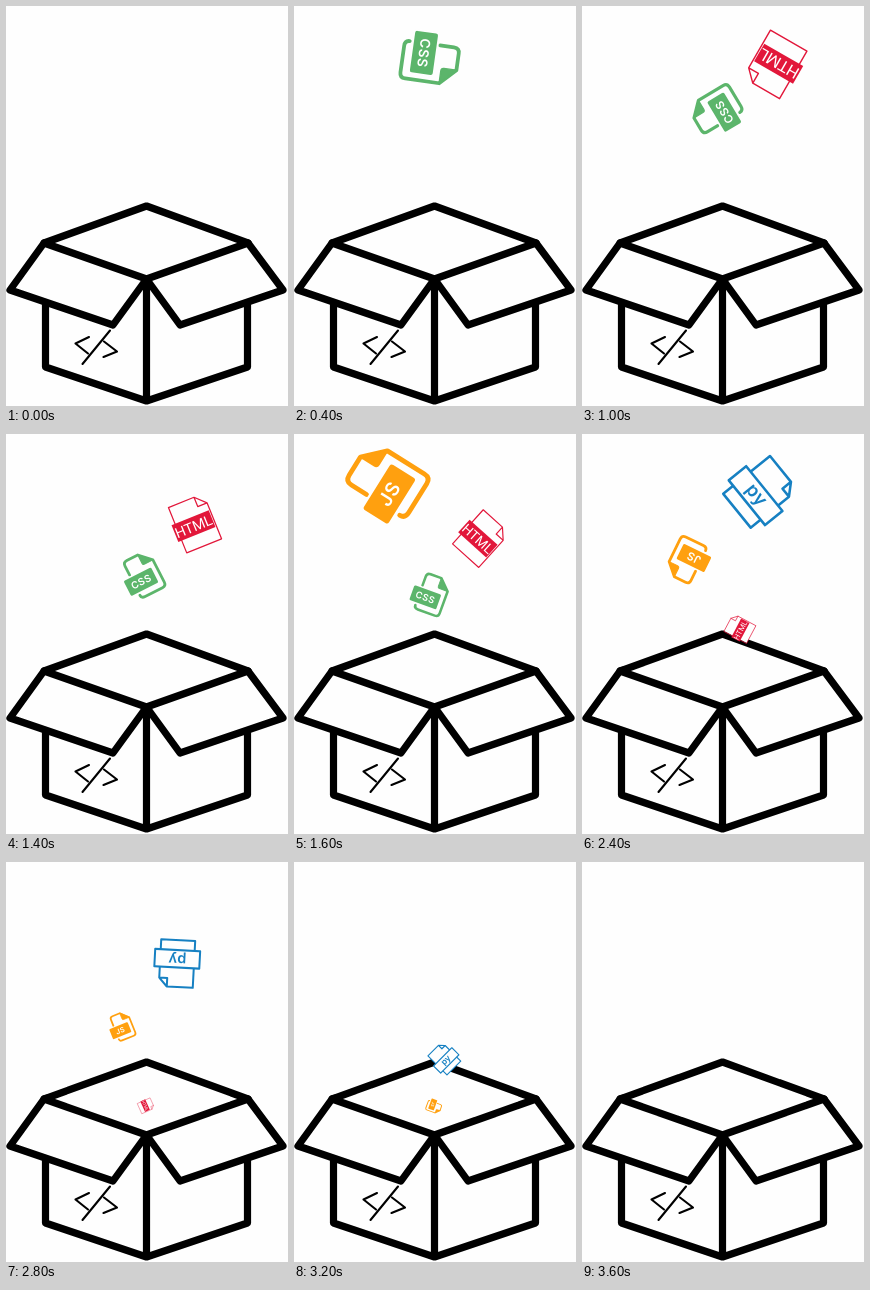
An HTML page that plays this animation: 282 px wide and 400 px high, repeating every 3800 ms.

```html
<!DOCTYPE html>
<html lang="en">
<head>
<meta charset="utf-8">
<title>Files into a box</title>
<style>
  html, body { margin: 0; width: 100%; height: 100%; overflow: hidden; background: #fefefe; }
  svg { display: block; width: 100%; height: 100%; }
  text { text-anchor: middle; font-family: Roboto, sans-serif; }
  .file { stroke-linejoin: round; stroke-linecap: round; }
  .tag { font-family: Inter, sans-serif; font-weight: 600; letter-spacing: .3px; }
</style>
</head>
<body>
<svg viewBox="0 0 282 400">
  <defs>
    <g id="sheet">
      <path d="M-10-6V-16Q-10-20-6-20H6L17-9V15.500Q17 19.500 13 19.500H-6Q-10 19.500-10 16" fill="none" stroke="currentColor" stroke-width="2.700"/>
      <path d="M6-20V-11Q6-9 8-9H17Z" fill="currentColor" stroke="currentColor"/>
      <rect x="-18" y="-3.500" width="30" height="16.500" rx="1.500" fill="currentColor" stroke="#fefefe" stroke-width="2.500" paint-order="stroke"/>
    </g>
  </defs>

  <g fill="none" stroke="#000" stroke-width="7.200" stroke-linejoin="round" stroke-linecap="round">
    <path d="M39.500 297V361L140.500 395L241.500 361V297M140.500 273V395"/>
    <path d="M140.500 200L242 237L140.500 273L38 237Z"/>
    <path d="M38 237L4 284L107 319L140.500 273L174 319L277 284L242 237"/>
    <path d="M83 331L69.500 337.500L82 347.500M104 324.500L76.500 358M98 335.500L111 345.500L97.500 351" stroke-width="2.100"/>
  </g>

  <g class="file" id="css" color="#5cb56b">
    <use href="#sheet"/>
    <text class="tag" x="-3" y="8.300" font-size="9.800" fill="#fff">CSS</text>
  </g>

  <g class="file" id="html" color="#e2173a">
    <path d="M-15-19.500H7L15-11.500V19.500H-15ZM7-19.500V-11.500H15" fill="#fefefe" stroke="currentColor"/>
    <rect x="-18" y="-5.500" width="32" height="14.500" fill="currentColor"/>
    <text x="-2" y="6" font-size="11.500" fill="#fff">HTML</text>
  </g>

  <g class="file" id="js" color="#ffa00f">
    <use href="#sheet"/>
    <text class="tag" x="-3" y="8.500" font-size="10.800" fill="#fff">JS</text>
  </g>

  <g class="file" id="py" color="#1680c2">
    <path d="M-17-23.500H9L17-15V23.500H-17ZM9-23.500V-15H17" fill="#fefefe" stroke="currentColor" stroke-width="2"/>
    <rect x="-22.500" y="-4" width="45" height="17.500" fill="#fefefe" stroke="currentColor" stroke-width="2"/>
    <text class="tag" y="8.500" font-size="14.500" fill="currentColor">py</text>
  </g>
</svg>
<script>
const STEP = 200, STEPS = 19;
const inside = { x: 140, y: 244, size: 0.36 };

// A file drifts from `from` to `over`, then drops inside the box, spinning evenly.
const files = {
  css: {
    enter: 1, drop: 8, gone: 11, turn: 380, spin: 47,
    from: { x: 136, y: 34, size: 1.47 }, over: { x: 135.5, y: 160, size: 0.95 }
  },
  html: {
    enter: 4, drop: 9, gone: 14, turn: 466, spin: 64,
    from: { x: 195, y: 43, size: 1.48 }, over: { x: 185, y: 120, size: 1.1 }
  },
  js: {
    enter: 8, drop: 14, gone: 16, turn: 338, spin: 66,
    from: { x: 91, y: 51, size: 1.78 }, over: { x: 115, y: 165, size: 0.66 }
  },
  py: {
    enter: 11, drop: 14, gone: 17, turn: 183, spin: 66,
    from: { x: 182, y: 36, size: 1.42 }, over: { x: 171, y: 101.5, size: 1 }
  }
};

const mix = (a, b, k) => a + (b - a) * k;

function place(id, step) {
  const { enter, drop, gone, turn, spin, from, over } = files[id];
  const node = document.getElementById(id);
  const visible = step >= enter && step <= gone;
  node.style.display = visible ? "" : "none";
  if (!visible) return;

  const drifting = step < drop;
  const [a, b] = drifting ? [from, over] : [over, inside];
  const k = drifting ? (step - enter) / (drop - enter) : (step - drop) / (gone - drop);
  const angle = turn + spin * (step - drop);
  node.setAttribute("transform",
    `translate(${mix(a.x, b.x, k)} ${mix(a.y, b.y, k)}) rotate(${angle}) scale(${mix(a.size, b.size, k)})`);
}

const start = performance.now();
function tick() {
  const step = Math.floor((performance.now() - start) / STEP) % STEPS;
  for (const id in files) place(id, step);
  requestAnimationFrame(tick);
}
tick();
</script>
</body>
</html>
```
